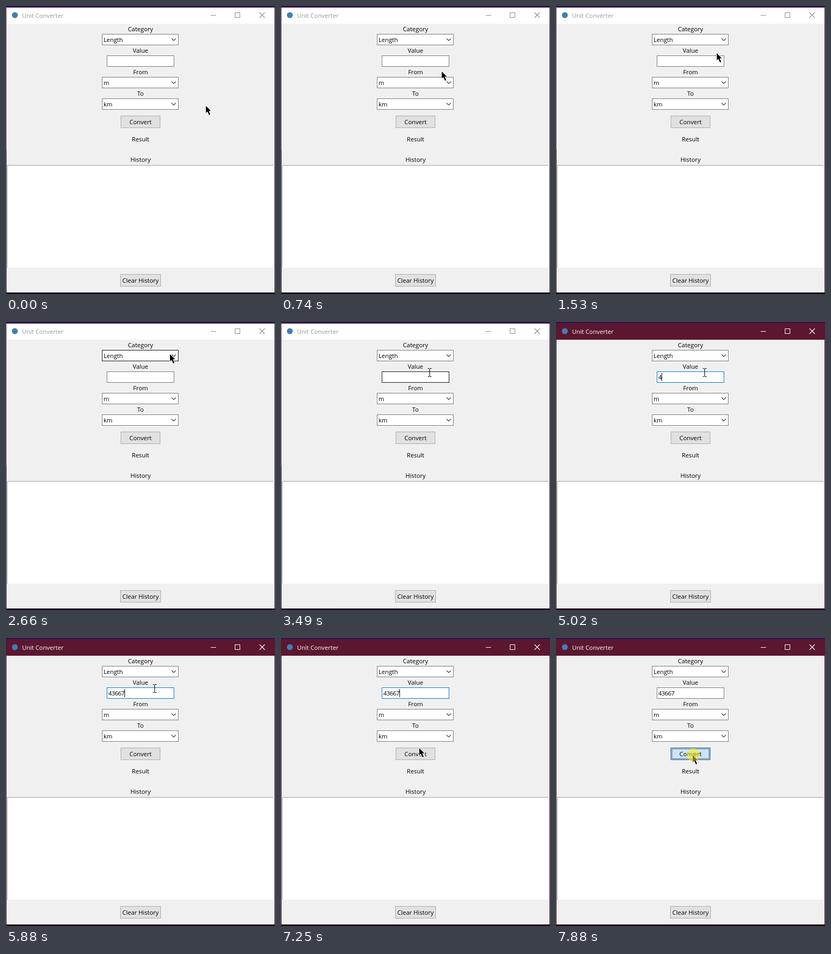
An HTML page with a canvas for the animation above (8 s loop, 502 px wide and 536 px high).

```html
<!DOCTYPE html>
<html lang="en">
<head>
<meta charset="utf-8">
<title>Unit Converter</title>
<style>
  html, body { margin: 0; width: 100%; height: 100%; overflow: hidden; }
  canvas { display: block; }
</style>
</head>
<body>
<canvas id="stage" width="502" height="536"></canvas>
<script>
const ctx = document.getElementById('stage').getContext('2d');
const LOOP = 8000;
const FONT = '11.3px "Open Sans", "Noto Sans", sans-serif';
const ACTIVATE = 4020, CLICK = 7880;

// Pointer moves: start, ms per step, steps, end x, end y
const START = [373, 185];
const MOVES = [
  [70, 0, 1, 341, 171],
  [330, 68, 7, 300, 121],
  [805, 67, 3, 300, 108],
  [1080, 0, 1, 298, 106],
  [1460, 70, 5, 304, 59],
  [2660, 0, 1, 306, 59],
  [2760, 100, 2, 309, 56],
  [3210, 70, 5, 277, 94],
  [6980, 67.5, 5, 258, 204],
  [7320, 70, 3, 255, 217]
];
const CLICKS = [[ACTIVATE, 4150], [CLICK, LOOP]];
const CARET_ON = [[4020, 4610], [4890, 5480], [5830, 6380], [6710, 7320], [7660, 7880]];
const VALUE = '43667';
const KEY_TIMES = [5020, 5350, 5680, 5830, 5880];

const within = (t, spans) => spans.some(([a, b]) => t >= a && t < b);
const over = ([px, py], x, y, w, h) => px >= x && px < x + w && py > y && py < y + h;

function pointerAt(t) {
  let [x, y] = START;
  for (const [start, gap, steps, ex, ey] of MOVES) {
    if (t < start) break;
    const done = gap ? Math.min(steps, Math.floor((t - start) / gap) + 1) : steps;
    x += (ex - x) * done / steps;
    y += (ey - y) * done / steps;
  }
  return [Math.round(x), Math.round(y)];
}

function rect(x, y, w, h, color) {
  ctx.fillStyle = color;
  ctx.fillRect(x, y, w, h);
}

function box(x, y, w, h, border, fill) {
  rect(x, y, w, h, border);
  rect(x + 1, y + 1, w - 2, h - 2, fill);
}

function text(str, x, y, color = '#000', align = 'left') {
  ctx.fillStyle = color;
  ctx.textAlign = align;
  ctx.fillText(str, x, y);
}

const label = (str, y) => text(str, 251, y, '#000', 'center');

function line(points, color, width = 1) {
  ctx.beginPath();
  points.forEach(([x, y]) => ctx.lineTo(x, y));
  ctx.strokeStyle = color;
  ctx.lineWidth = width;
  ctx.stroke();
}

function disc(x, y, r, color) {
  ctx.beginPath();
  ctx.arc(x, y, r, 0, Math.PI * 2);
  ctx.fillStyle = color;
  ctx.fill();
}

function drawWindow(active) {
  const frame = active ? '#5c1730' : '#4a2a4c';
  const ink = active ? '#fff' : '#8c8c8c';
  rect(0, 0, 502, 536, '#100a18');
  rect(0, 0, 502, 2, '#2c1250');
  rect(0, 2, 502, 532, frame);
  if (!active) {
    rect(0, 2, 1, 266, '#7a4a70');
    rect(0, 268, 1, 266, '#2c2030');
  }
  rect(1, 3, 500, 30, active ? '#5c1730' : '#fff');
  rect(1, 33, 500, 500, '#f0f0f0');
  disc(16.5, 17, 5.5, '#3f7fb5');
  text('Unit Converter', 30, 22, active ? '#fff' : '#929a94');
  rect(382, 17, 10, 1, ink);
  ctx.strokeStyle = ink;
  ctx.lineWidth = 1;
  ctx.strokeRect(427.5, 12.5, 9, 9);
  line([[473, 12], [483, 22]], ink, 1.1);
  line([[483, 12], [473, 22]], ink, 1.1);
}

function combo(str, y, pointer) {
  const hot = over(pointer, 179, y, 143, 21);
  box(179, y, 143, 21, hot ? '#171717' : '#7a7a7a', '#fff');
  text(str, 182, y + 15);
  line([[309, y + 8.5], [313, y + 12.5], [317, y + 8.5]], '#404040', 1.2);
}

function entry(t, pointer) {
  const focused = t >= ACTIVATE && t < CLICK;
  const hot = over(pointer, 188, 92, 126, 21);
  box(188, 92, 126, 21, focused ? '#0078d7' : hot ? '#171717' : '#7a7a7a', '#fff');
  const typed = KEY_TIMES.filter(k => t >= k).length;
  for (let i = 0; i < typed; i++) text(VALUE[i], 191 + 6 * i, 107);
  if (within(t, CARET_ON)) rect(191 + 6 * typed, 95, 1, 15, '#000');
}

function convertButton(t, pointer) {
  const pressed = t >= CLICK;
  if (pressed) box(214, 204, 74, 23, '#005499', '#cce4f7');
  else if (over(pointer, 214, 204, 74, 23)) box(214, 204, 74, 23, '#0078d7', '#e5f1fb');
  else box(214, 204, 74, 23, '#adadad', '#e1e1e1');
  if (pressed) {
    ctx.setLineDash([1, 1]);
    ctx.strokeStyle = '#000';
    ctx.lineWidth = 1;
    ctx.strokeRect(216.5, 206.5, 69, 18);
    ctx.setLineDash([]);
  }
  label('Convert', 220);
}

function drawPointer([x, y]) {
  if (over([x, y], 188, 92, 126, 21)) {
    rect(x, y - 7, 1, 14, '#000');
    for (const dy of [-8, 7]) {
      rect(x - 3, y + dy, 3, 1, '#000');
      rect(x + 1, y + dy, 3, 1, '#000');
    }
    return;
  }
  const shape = [[0, 1], [0, 14], [3, 11.3], [6, 18], [8.3, 17], [5.4, 10.4], [9.3, 10.2]];
  ctx.beginPath();
  shape.forEach(([dx, dy]) => ctx.lineTo(x + dx, y + dy));
  ctx.closePath();
  ctx.strokeStyle = '#fff';
  ctx.lineWidth = 1.6;
  ctx.stroke();
  ctx.fillStyle = '#000';
  ctx.fill();
}

function draw(t) {
  const pointer = pointerAt(t);
  ctx.font = FONT;
  drawWindow(t >= ACTIVATE);

  label('Category', 47);
  combo('Length', 52, pointer);
  label('Value', 87);
  entry(t, pointer);
  label('From', 127);
  combo('m', 132, pointer);
  label('To', 167);
  combo('km', 172, pointer);
  convertButton(t, pointer);
  label('Result', 252);
  label('History', 290);

  rect(2, 296, 498, 191, '#a0a0a0');
  rect(3, 297, 496, 190, '#fff');
  rect(499, 296, 1, 191, '#fff');
  box(213, 499, 76, 23, '#adadad', '#e1e1e1');
  label('Clear History', 515);

  drawPointer(pointer);
  if (within(t, CLICKS)) disc(pointer[0] + 0.5, pointer[1], 12, 'rgba(255, 240, 0, 0.5)');
}

const begin = performance.now();
function tick() {
  draw((performance.now() - begin) % LOOP);
  requestAnimationFrame(tick);
}
tick();
</script>
</body>
</html>
```
